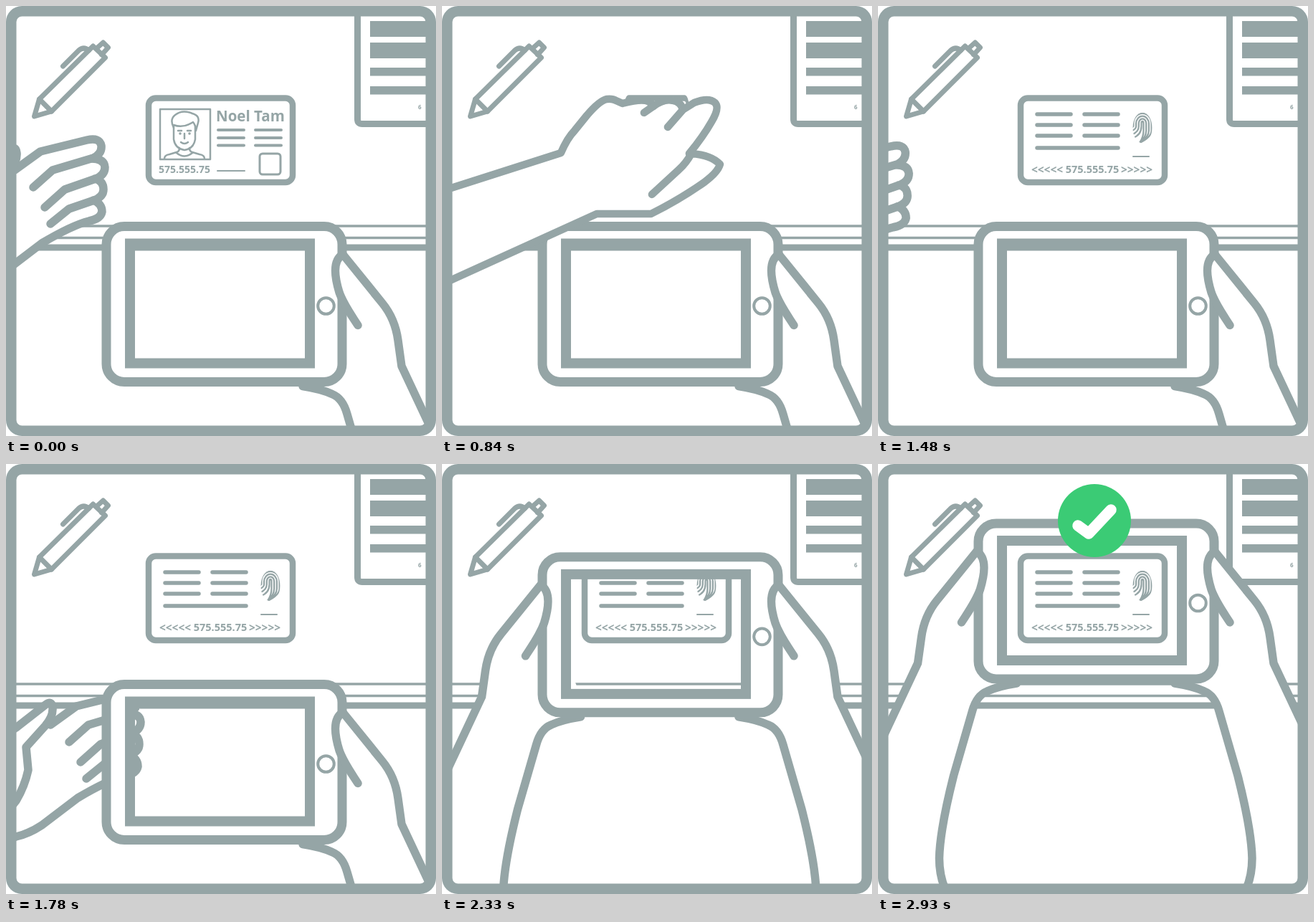
An HTML page for the animation above (3.59 s loop, 600 by 600 pixels).

```html
<!DOCTYPE html>
<html lang="en">
<head>
<meta charset="utf-8">
<title>ID card scan</title>
<style>
  html, body { margin: 0; width: 100%; height: 100%; overflow: hidden; background: #fff; }
  svg { display: block; width: 100vw; height: 100vh; }
  text { font-family: "Open Sans", sans-serif; font-weight: 700; fill: #95a5a6; stroke: none; }
  .line { fill: none; }
  .blank { stroke: none; }
  .solid { fill: #95a5a6; stroke: none; }
</style>
</head>
<body>
<svg viewBox="0 0 600 600" fill="#fff" stroke="#95a5a6" stroke-linecap="round" stroke-linejoin="round">
  <defs>
    <clipPath id="inside"><rect x="8" y="8" width="584" height="584" rx="12"/></clipPath>
    <clipPath id="oval"><ellipse cx="369" cy="170" rx="13.5" ry="21.5"/></clipPath>
    <g id="forearm" stroke-width="11.5">
      <path class="blank" d="M470 122L525 190Q543 212 547 242L552 278 640 465V640H513Q524 575 522 550 522 510 502 435L476 345Q470 324 455 317L405 304Z"/>
      <path class="line" d="M414 306Q440 310 455 317 470 323 476 345L502 435Q521 510 522 550 522 575 513 595"/>
    </g>
    <g id="thumb" stroke-width="11.5">
      <path class="blank" d="M470 122C456 130 458 152 465 175 471 192 482 207 491 221L552 278 547 242Q543 212 525 190Z"/>
      <path class="line" d="M491 221C482 207 471 192 465 175 458 152 456 130 470 122L525 190Q543 212 547 242L552 278 640 465"/>
    </g>
  </defs>

  <g clip-path="url(#inside)">
    <path class="line" stroke-width="3.5" d="M0 307H600M0 323.5H600"/>
    <path class="line" stroke-width="9" d="M0 337H600"/>

    <g id="paper">
      <path stroke-width="9" d="M490.5 0V158Q490.5 164.5 497 164.5H610V0Z"/>
      <path class="solid" d="M508 21H600V43H508ZM508 51H600V73H508ZM508 86H600V97.5H508ZM508 112H600V123.5H508Z"/>
      <text x="575" y="144" font-size="8">6</text>
    </g>

    <g id="pen" stroke-width="7" transform="translate(-.5 1)">
      <path d="M40 153L47 129 122 55 139 71 64 146Z"/>
      <path class="line" d="M47 129L64 146M80 83L102 61Q109 55 116 61M127 58L136 50 143 57 134 67"/>
    </g>

    <g id="card">
      <rect x="199" y="128.5" width="201" height="117.5" rx="10" stroke-width="8.5"/>
      <g id="front">
        <rect x="215" y="144" width="70" height="70" stroke-width="2.5"/>
        <g class="line" stroke-width="2.5">
          <path d="M221 213Q221 208 228 207L238 204Q242 203 242 198M277 213Q277 208 270 207L260 204Q256 203 256 198M238 205Q249 214 260 205"/>
          <path d="M234 168V186Q236 199 249 201 262 199 264 186V167"/>
          <path d="M234 170Q228 158 236 152 246 144 260 150 271 153 268 163L265 174Q265 167 261 162 247 171 234 166"/>
          <path d="M240 174H245M253 174H258M249 178V185M244 190Q249 194 254 190"/>
        </g>
        <circle class="solid" cx="243" cy="178" r="1.8"/><circle class="solid" cx="256" cy="178" r="1.8"/>
        <text x="293" y="161" font-size="20.5">Noel Tam</text>
        <path class="line" stroke-width="4" d="M296 173H332M296 184H332M296 194.5H332M348 173H384M348 184H384M348 194.5H384"/>
        <text x="213" y="233" font-size="14">575.555.75</text>
        <path class="line" stroke-width="2" d="M295 230H333"/>
        <rect x="354" y="206" width="29" height="29" rx="4" stroke-width="3"/>
      </g>
      <g id="back">
        <path class="line" stroke-width="5.5" d="M222 151H269M288 151H335M222 166H269M288 166H335M222 181H269M288 181H335M222 198H335"/>
        <g id="print" class="line" clip-path="url(#oval)" stroke-width="2.3"></g>
        <path class="line" stroke-width="2" d="M356 210H378"/>
        <g font-size="14.5" text-anchor="middle">
          <text x="236" y="234" font-size="15.5">&lt;&lt;&lt;&lt;&lt;</text>
          <text x="299" y="233">575.555.75</text>
          <text x="361" y="234" font-size="15.5">&gt;&gt;&gt;&gt;&gt;</text>
        </g>
      </g>
    </g>

    <g id="fist" stroke-width="11.5">
      <path class="blank" d="M-300 400L-36 233 10 198 18 215 48 203 118 186 135 195 140 225 139 258 134 290 105 304 50 331 0 370-36 385-300 500Z"/>
      <path class="line" d="M12 229L48 203 113 187Q131 183 133 195 134 206 122 212L65 229 38 253"/>
      <path class="line" d="M120 213Q137 213 138 225 138 236 125 241L82 256 54 281M124 241Q136 244 136 256 136 266 123 271L88 283 62 304"/>
      <path class="line" d="M122 271Q134 276 134 287 132 297 116 300 92 306 50 331L0 369Q-18 381-36 385L-300 470"/>
      <path class="line" d="M-300 400L-36 233 5 201Q14 194 15 205 16 217 5 230L-22 260-19 292Q-24 315-36 335L-80 390"/>
    </g>

    <g id="arms"><use href="#forearm"/><g class="left"><use href="#forearm"/></g></g>

    <g id="tablet">
      <path class="blank" fill-rule="evenodd" d="M164 83H445Q469 83 469 107V276Q469 300 445 300H164Q140 300 140 276V107Q140 83 164 83ZM175 109V272H422V109Z"/>
      <rect class="line" x="140" y="83" width="329" height="217" rx="25" stroke-width="13"/>
      <rect class="line" x="173" y="107" width="251" height="167" stroke-width="14" stroke-linejoin="miter"/>
      <circle cx="446.5" cy="194" r="11.3" stroke-width="4"/>
    </g>

    <g id="thumbs"><use href="#thumb"/><g class="left"><use href="#thumb"/></g></g>

    <g id="grab" stroke-width="10.5">
      <path class="blank" d="M-250 348L34 257 48 233 70 205 90 186 103 182 120 189 146 183 162 192 180 182 203 192 225 186 245 182 254 195 244 220 213 258 224 258 256 273 234 298 160 342 84 342-250 494Z"/>
      <path class="line" d="M-250 348L34 257Q43 236 53 226L70 205Q88 184 98 182 106 181 111 184L120 188Q143 182 152 184 160 186 163 192L150 201"/>
      <path class="line" d="M163 192Q178 181 190 184 202 186 204 197L183 221M204 197L220 187Q240 179 249 187 256 194 244 214 232 235 213 258"/>
      <path class="line" d="M161 315L198 281Q209 271 216 258 244 260 256 273 253 284 234 298 200 322 160 342H84L-250 494"/>
    </g>

    <g id="badge" stroke="none">
      <circle cx="302" cy="79" r="51" fill="#3bcb75"/>
      <path class="line" stroke="#fff" stroke-width="15.5" d="M279 86L294 97 325 64"/>
    </g>
  </g>
  <rect class="line" x="7.25" y="7.25" width="585.5" height="585.5" rx="15" stroke-width="14.5"/>
</svg>
<script>
const LOOP = 3590, LIFT = 224.5, MIRROR = 607.5;
const $ = id => document.getElementById(id);
const linear = u => u;
const easeIn = u => u * u;
const easeOut = u => 1 - (1 - u) ** 2;
const sine = u => (1 - Math.cos(Math.PI * u)) / 2;
const part = (t, from, to) => Math.min(1, Math.max(0, (t - from) / (to - from)));
const mix = (a, b, u) => a + (b - a) * u;
const move = (id, x, y) => $(id).setAttribute("transform", `translate(${x} ${y})`);
const show = (id, on) => { $(id).style.display = on ? "" : "none"; };
const leftHand = document.querySelectorAll(".left");

// Each stop: time, x, y, easing used on the way to it
const fistPath = [
  [0, 0, 0], [260, -170, -30, easeIn], [1390, -170, -30, linear],
  [1620, 20, 68, linear], [1780, 50, 135, easeOut]
];
const grabPath = [
  [210, -275, 90], [540, 0, 0, easeOut], [1020, 190, -75, sine],
  [1140, 86, -70, easeIn], [1380, -275, 10, linear]
];

function along(path, t) {
  const i = path.findIndex(stop => stop[0] >= t);
  if (i < 0) return path[path.length - 1].slice(1, 3);
  if (i === 0) return path[0].slice(1, 3);
  const [t0, x0, y0] = path[i - 1], [t1, x1, y1, ease] = path[i];
  const u = ease(part(t, t0, t1));
  return [mix(x0, x1, u), mix(y0, y1, u)];
}

// Fingerprint: nested arches whose left legs sweep outwards
let ridges = "";
for (let r = 1.5; r < 14; r += 3.7)
  ridges += `M${356 - r} ${186 - r}Q${369 - r} ${182 - r} ${369 - r} 168`
    + `v-4a${r} ${r + 1.5} 0 0 1 ${2 * r} 0v10q0 9 -${4 + r} 17`;
$("print").innerHTML = `<path d="${ridges}"/>`;

function draw(t) {
  const turn = Math.cos(Math.PI * sine(part(t, 640, 980)));
  const width = Math.max(0.02, Math.abs(turn));
  $("card").setAttribute("transform", `translate(${299.5 * (1 - width)} 0) scale(${width} 1)`);
  show("front", turn > 0);
  show("back", turn <= 0);

  const lift = LIFT * (1 - sine(part(t, 1825, 2550)));
  for (const id of ["arms", "tablet", "thumbs"]) move(id, 0, lift);

  const holding = t >= 1880;
  const slide = -120 * (1 - easeOut(part(t, 1880, 2020)));
  for (const g of leftHand) {
    g.style.display = holding ? "" : "none";
    g.setAttribute("transform", `translate(${MIRROR + slide} 0) scale(-1 1)`);
  }

  move("fist", ...along(fistPath, t));
  show("fist", t < 260 || (t > 1390 && !holding));
  move("grab", ...along(grabPath, t));
  show("grab", t > 210 && t < 1380);

  $("badge").style.opacity = part(t, 2560, 2700);
  move("badge", 0, 23 * (1 - easeOut(part(t, 2690, 2930))));
}

const start = performance.now();
function tick() {
  draw((performance.now() - start) % LOOP);
  requestAnimationFrame(tick);
}
tick();
</script>
</body>
</html>
```
